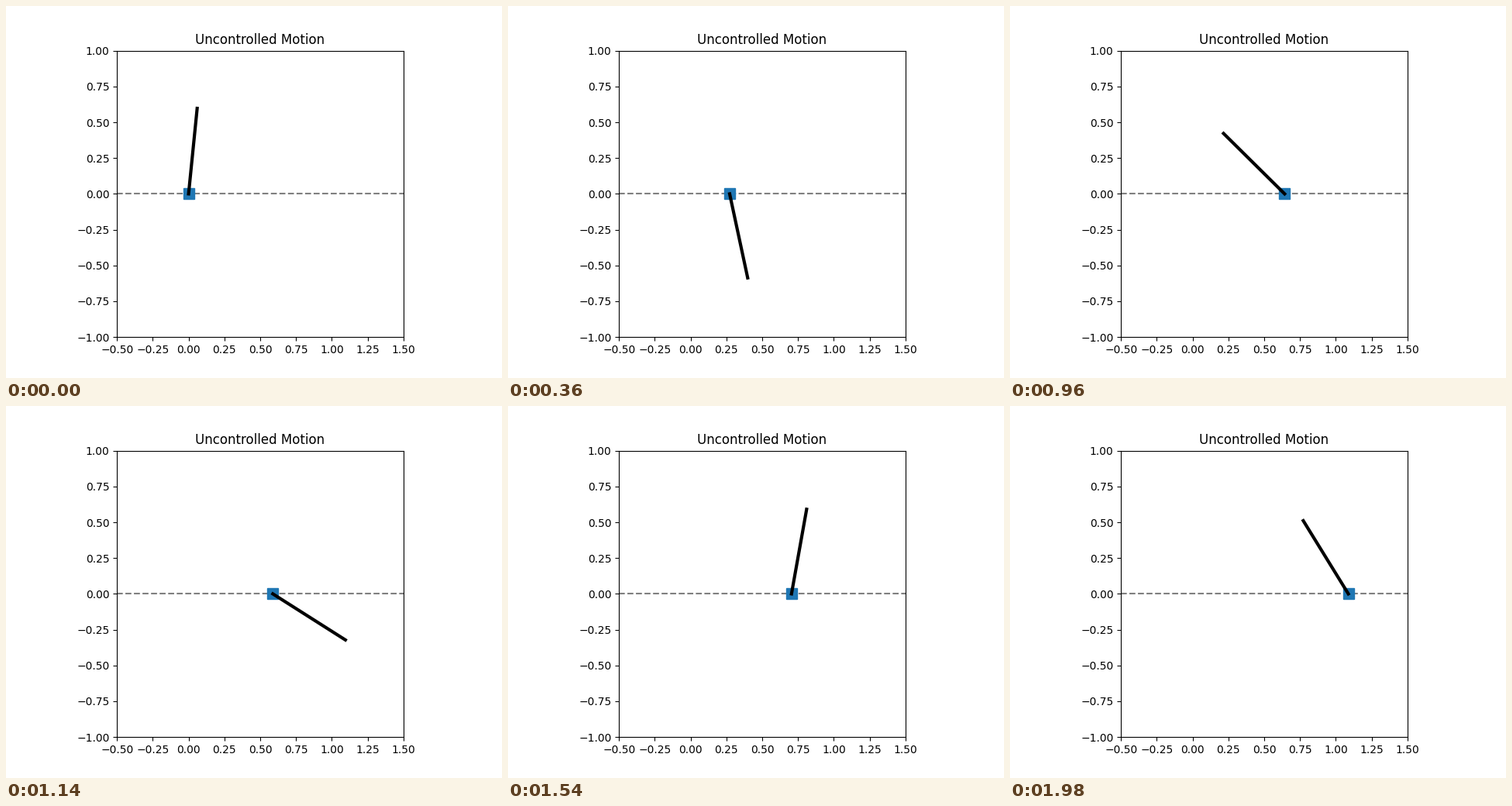
These frames come from a looping animation (640x480 px, 2000 ms). A matplotlib script:

```python
import numpy as np
import matplotlib.pyplot as plt
from matplotlib.animation import FuncAnimation

FRAMES, INTERVAL = 100, 20
LENGTH = 0.6
SUBSTEPS = 10

# Motion constants, with one frame as the unit of time
RATE = 0.2377        # fall rate of the pole near upright
POLE_DRAG = 2.1e-5
CART_DRAG = 0.0019
DRIFT = 0.01


def flow(state):
    """Time derivative of (cart position, angle from upright, angular speed)."""
    x, angle, speed = state
    push = speed * (0.0345 - 0.0115 * np.cos(angle))
    return np.array([
        DRIFT + push - CART_DRAG * x,
        speed,
        RATE ** 2 * np.sin(angle) - POLE_DRAG * speed,
    ])


def rk4(state, h):
    k1 = flow(state)
    k2 = flow(state + h / 2 * k1)
    k3 = flow(state + h / 2 * k2)
    k4 = flow(state + h * k3)
    return state + h / 6 * (k1 + 2 * k2 + 2 * k3 + k4)


def simulate():
    state = np.array([0.0, 0.1, 0.0])
    path = []
    for _ in range(FRAMES):
        path.append(state)
        for _ in range(SUBSTEPS):
            state = rk4(state, 1 / SUBSTEPS)
    return path


path = simulate()

fig, ax = plt.subplots(figsize=(6.4, 4.8), dpi=100)
ax.set_aspect("equal")
ax.set_xlim(-0.5, 1.5)
ax.set_ylim(-1, 1)
ax.set_title("Uncontrolled Motion")
ax.axhline(0, color="gray", linestyle="--")
cart, = ax.plot([], [], "s", color="tab:blue", markersize=10)
pole, = ax.plot([], [], color="black", linewidth=3)


def draw(i):
    x, angle, _ = path[i]
    cart.set_data([x], [0])
    pole.set_data([x, x + LENGTH * np.sin(angle)], [0, LENGTH * np.cos(angle)])
    return cart, pole


anim = FuncAnimation(fig, draw, frames=FRAMES, interval=INTERVAL,
                     repeat=True, repeat_delay=0)
plt.show()
```
